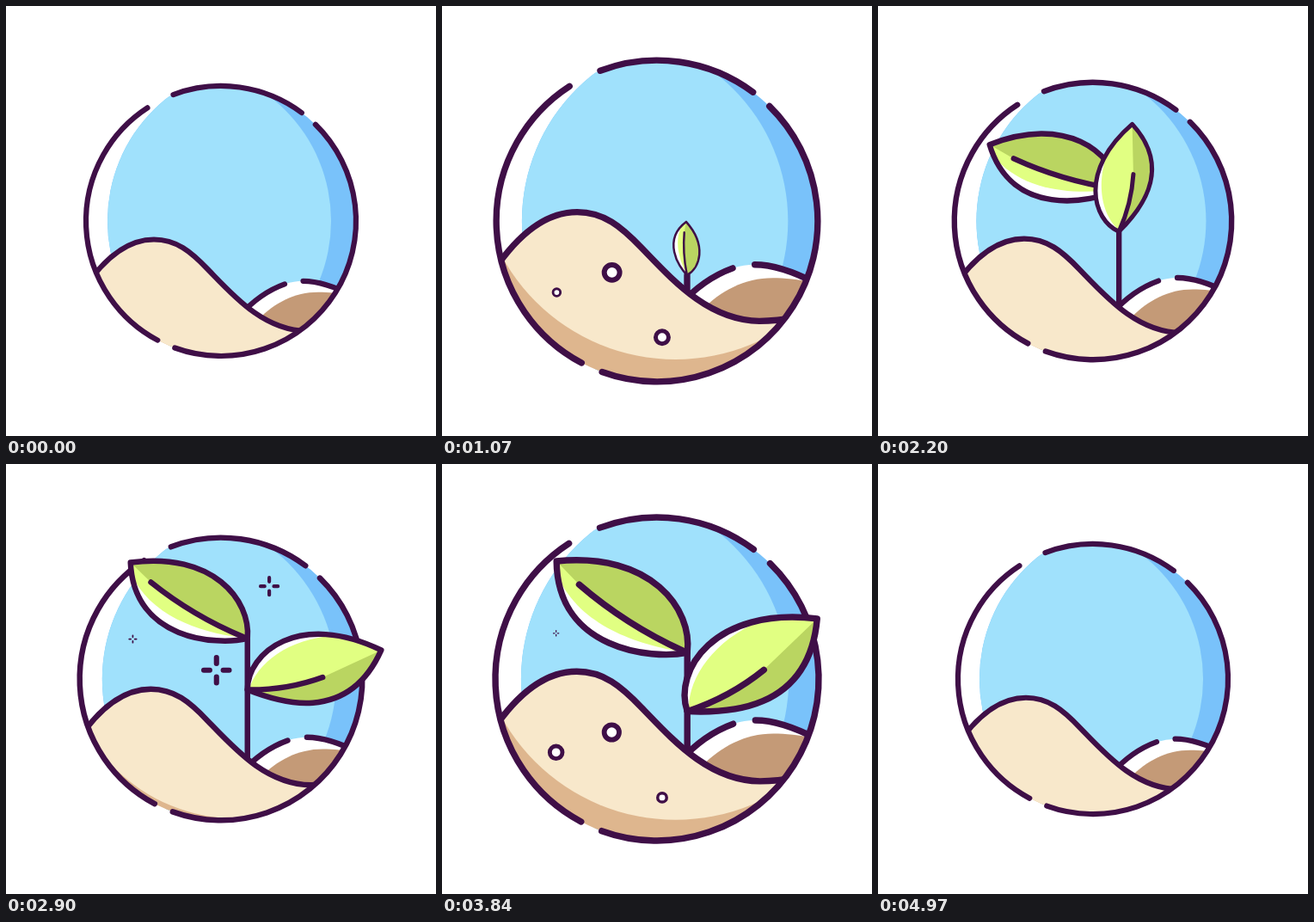
These frames come from a looping animation (500 px wide and 500 px high, 5 s). An HTML page:

```html
<!DOCTYPE html>
<html lang="en">
<head>
<meta charset="utf-8">
<title>Sprout</title>
<style>
  html, body { margin: 0; width: 100%; height: 100%; overflow: hidden; background: #fff; }
  svg { display: block; width: 100vw; height: 100vh; }
  .line { fill: none; stroke: #3f0f47; stroke-width: 6.2; stroke-linecap: round; stroke-linejoin: round; }
  .stone { fill: #fff; stroke: #3f0f47; stroke-width: 5.2; }
  .lime { fill: #e1ff82; }
  .green { fill: #bad561; }
</style>
</head>
<body>
<svg viewBox="0 0 500 500">
  <defs>
    <clipPath id="disc"><circle r="157"/></clipPath>
    <clipPath id="skyLeft"><circle cx="50.5" r="182.5"/></clipPath>
    <clipPath id="underHill"><path id="underPath"/></clipPath>
    <clipPath id="aboveHill"><path id="abovePath"/></clipPath>
    <clipPath id="clipA"><path id="shapeA" d="M0 0C25 -26 105 -70 155 0C85 60 20 38 0 0Z"/></clipPath>
    <clipPath id="clipB"><path id="shapeB" d="M0 0C12 -40 80 -68 155 0C95 70 28 22 0 0Z"/></clipPath>
    <path id="spark" class="line" d="M8 0H15M-8 0H-15M0 8V15M0 -8V-15"/>
  </defs>
  <g id="world">
    <g clip-path="url(#disc)">
      <circle r="157" fill="#fff"/>
      <g clip-path="url(#skyLeft)">
        <circle r="160" fill="#79c2fa"/>
        <circle cx="-54.5" r="182.5" fill="#a0e1fc"/>
      </g>
      <g id="back">
        <path fill="#fff" d="M22 110Q45 84 74 73.5Q85 70 95.5 70C110 70 128 74 155 88V190H22Z"/>
        <path fill="#c49a77" d="M44 114C62 96 85 83 113 83C125 83 137 84 155 88V190H44Z"/>
        <path class="line" d="M22 110Q45 84 74 73.5M95.5 70C110 70 128 74 155 88"/>
      </g>
      <g id="sand">
        <g clip-path="url(#underHill)">
          <rect x="-200" width="400" height="300" fill="#deb68e"/>
          <circle cx="18" cy="-27" r="193" fill="#f8e8cb"/>
        </g>
        <circle class="stone" r="7.8"/>
        <circle class="stone" r="7.8"/>
        <circle class="stone" r="7.8"/>
      </g>
    </g>
    <path id="ring" class="line"/>
    <use class="spark" href="#spark"/>
    <use class="spark" href="#spark"/>
    <use class="spark" href="#spark"/>
    <g clip-path="url(#aboveHill)">
      <path id="stem" class="line"/>
      <g id="leafA">
        <g clip-path="url(#clipA)">
          <rect y="-70" width="160" height="140" fill="#fff"/>
          <path class="lime" d="M0 0C40 -20 95 -38 141 -14L155 0L124 10Z"/>
          <path class="green" d="M0 0Q64 -12 124 -6L155 0V70H0Z"/>
        </g>
        <path class="line" d="M5 -1Q64 -12 124 -6"/>
        <use href="#shapeA" class="line"/>
      </g>
      <g id="leafB">
        <g clip-path="url(#clipB)">
          <rect y="-70" width="160" height="140" fill="#fff"/>
          <path class="lime" d="M2 0C18 -25 60 -42 110 -30L120 -50H160V20H0Z"/>
          <path class="green" d="M0 0Q42 13 84 10.4L155 0V70H0Z"/>
        </g>
        <path class="line" d="M0 0Q42 13 84 10.4"/>
        <use href="#shapeB" class="line"/>
      </g>
    </g>
    <g clip-path="url(#disc)"><path id="hillLine" class="line"/></g>
  </g>
</svg>
<script>
const LOOP = 5000, PULSE = 2500, STEM_X = 29.4;
const HILL = 'M-160 80C-140 50 -112 22 -78 22C-52 22 -35 36 -15 57C15 88 50 128 100 128.5C112 128.5 125 127 135 125';

const el = id => document.getElementById(id);
const place = (node, x, y, scale = 1, turn = 0) =>
  node.setAttribute('transform', `translate(${x} ${y}) rotate(${turn}) scale(${scale})`);

// Arc pieces of the outer ring, in degrees
const point = deg => {
  const a = deg * Math.PI / 180;
  return `${157 * Math.cos(a)} ${157 * Math.sin(a)}`;
};
const arc = ([from, to]) => `M${point(from)}A157 157 0 ${to - from > 180 ? 1 : 0} 1 ${point(to)}`;
el('ring').setAttribute('d', [[-110.7, -53.3], [-45.6, 110], [118, 237]].map(arc).join(''));

el('hillLine').setAttribute('d', HILL);
el('underPath').setAttribute('d', HILL + 'L200 300H-200Z');
el('abovePath').setAttribute('d', HILL + 'H400V-400H-400V80Z');

// Smooth curve through [time, value] keys, flat at turning points
function track(keys) {
  const grade = i => (keys[i + 1][1] - keys[i][1]) / (keys[i + 1][0] - keys[i][0]);
  const slopes = keys.map((k, i) => {
    if (i === 0 || i === keys.length - 1) return 0;
    const a = grade(i - 1), b = grade(i);
    return a * b <= 0 ? 0 : 2 * a * b / (a + b);
  });
  return t => {
    if (t <= keys[0][0]) return keys[0][1];
    const i = keys.findIndex(k => k[0] > t) - 1;
    if (i < 0) return keys[keys.length - 1][1];
    const [t0, v0] = keys[i], [t1, v1] = keys[i + 1];
    const d = t1 - t0, u = (t - t0) / d, w = 1 - u;
    return v0 * (1 + 2 * u) * w * w + v1 * u * u * (3 - 2 * u)
      + d * u * w * (slopes[i] * w - slopes[i + 1] * u);
  };
}

const wave = t => (1 - Math.cos(2 * Math.PI * t / PULSE)) / 2;

const stemTop = track([[750, 105], [1070, 53], [1600, -28], [2200, -36], [2900, -45]]);
const sink = track([[3400, 0], [3750, 12], [4200, 82], [4700, 270]]);
const sizeA = track([[780, 0], [1070, .335], [1650, 1]]);
const turnA = track([[1150, 269], [2200, 199], [2900, 213], [3400, 219.4], [3800, 215], [4200, 215.3], [4700, 250]]);
const sizeB = track([[1600, 0], [2200, .79], [2500, 1]]);
const turnB = track([[2150, -84], [2200, -83], [2350, -74], [2670, -28], [2880, -16.5], [3400, -23.5], [3740, -35], [4200, -36.8], [4700, -65]]);

const stones = [
  { x: -44, y: 81, size: track([[540, 0], [900, 7.4], [1150, 10.5], [1700, 5.9], [2150, 0]]) },
  { x: -98, y: 100.5, size: track([[600, 0], [900, 3.4], [1070, 4.8], [1620, 10.4], [1700, 10], [2210, 0]]) },
  { x: 5, y: 144.4, size: track([[380, 0], [880, 10.5], [1070, 8.4], [1700, 2], [1800, 0]]) }
];
const sparks = [
  { x: 53.6, y: -103, size: track([[2550, 0], [2900, 11.5], [3150, 16], [3400, 12.9], [3750, 0]]) },
  { x: -5, y: -9.8, size: track([[2500, 0], [2920, 17], [3400, 6], [3650, 0]]) },
  { x: -98, y: -44.4, size: track([[2750, 0], [2900, 4.8], [3400, 18], [4000, 0]]) }
];
const stoneNodes = document.querySelectorAll('.stone');
const sparkNodes = document.querySelectorAll('.spark');

function draw(t) {
  const lift = -31 * wave(t + 100), down = sink(t);
  const top = stemTop(t) + down;

  place(el('world'), 250, 250, 1 + .2 * wave(t));
  place(el('back'), 0, -30 * wave(t - 60));
  for (const id of ['sand', 'hillLine', 'abovePath']) place(el(id), 0, lift);

  el('stem').setAttribute('d', `M${STEM_X} ${top}V140`);
  place(el('leafA'), STEM_X, top, sizeA(t), turnA(t));
  place(el('leafB'), STEM_X, 12 + down, sizeB(t), turnB(t));

  stones.forEach((s, i) => place(stoneNodes[i], s.x, s.y, s.size(t % PULSE) / 10.4));
  sparks.forEach((s, i) => place(sparkNodes[i], s.x, s.y, s.size(t) / 18));
}

function tick() {
  draw(performance.now() % LOOP);
  requestAnimationFrame(tick);
}
tick();
</script>
</body>
</html>
```
